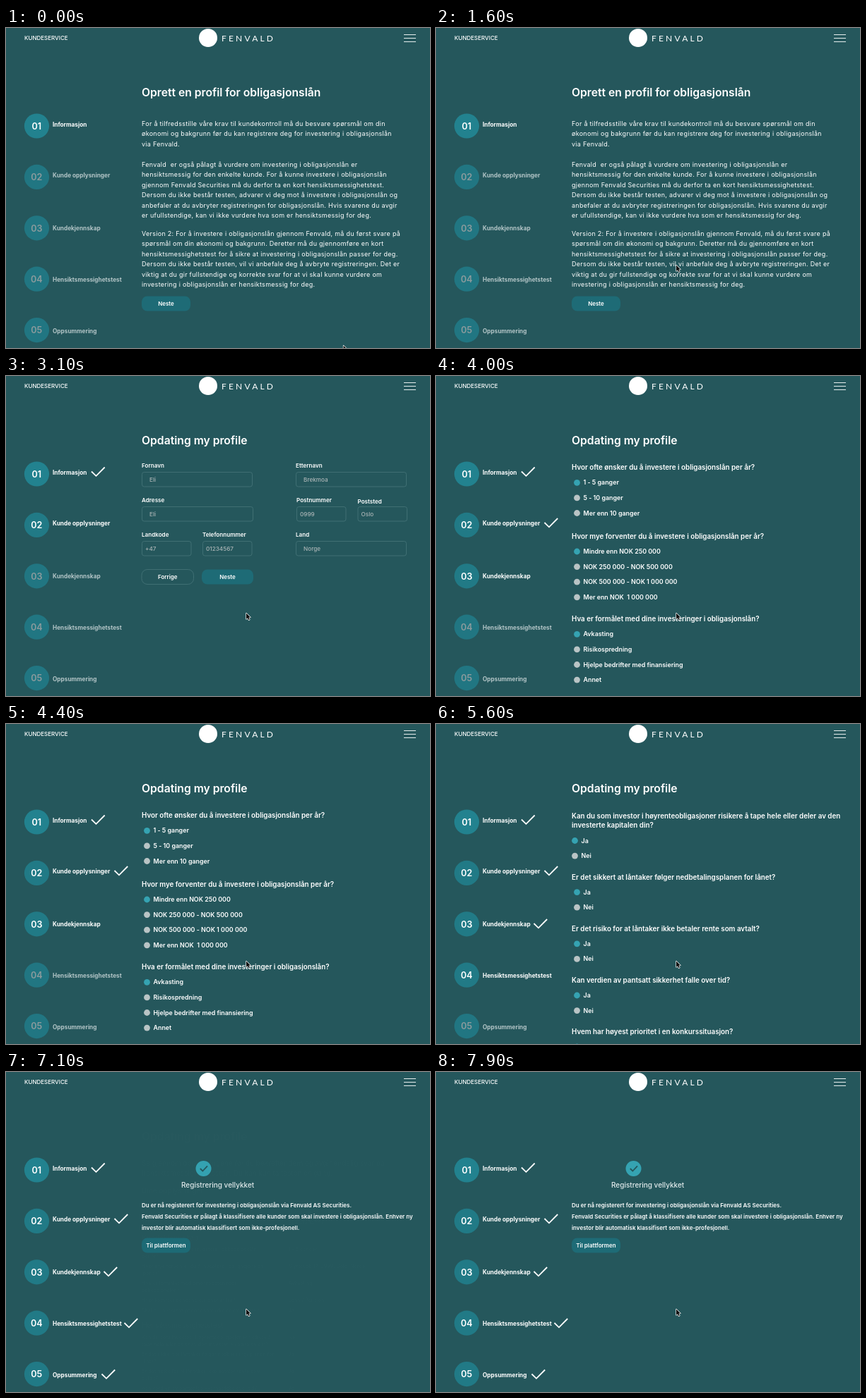
These frames come from a looping animation (600 px wide and 454 px high, 8000 ms). An HTML page with a canvas:

```html
<!DOCTYPE html>
<html lang="no">
<head>
<meta charset="utf-8">
<title>Registrering</title>
<style>
html, body { margin: 0; width: 600px; height: 454px; overflow: hidden; background: #25575c; }
canvas { display: block; width: 600px; height: 454px; }
</style>
</head>
<body>
<canvas id="stage"></canvas>
<script>
const LOOP = 8000, STEP = 100, FADE = 450;
const SWITCHES = [1750, 3150, 4450, 5700, 6700];
const BG = '#25575c', WHITE = '#fff', TEAL = '#35a3b2', BUTTON = '#1e6b76', LINE = '#437277';
const COMPANY = 'Fenvald', FIRST = 'Eli', LAST = 'Brekmoa', PHONE = '01234567';
const POSTCODE = '0999', ADDRESS = `Myrstubb 17, ${POSTCODE}, Oslo, Norge`;

const canvas = document.getElementById('stage');
const ctx = canvas.getContext('2d');
const ratio = window.devicePixelRatio || 1;
canvas.width = 600 * ratio;
canvas.height = 454 * ratio;
ctx.scale(ratio, ratio);

function text(str, x, y, size, { weight = 600, color = WHITE, align = 'left', spacing = 0, family = 'Inter' } = {}) {
  ctx.font = `${weight} ${size}px ${family}, sans-serif`;
  ctx.letterSpacing = spacing + 'px';
  ctx.textAlign = align;
  ctx.fillStyle = color;
  ctx.fillText(str, x, y);
}

function lines(list, x, y, leading, size, style) {
  list.forEach((str, i) => text(str, x, y + i * leading, size, style));
}

function disc(x, y, r, color) {
  ctx.fillStyle = color;
  ctx.beginPath();
  ctx.arc(x, y, r, 0, Math.PI * 2);
  ctx.fill();
}

function stroke(points, color, width) {
  ctx.strokeStyle = color;
  ctx.lineWidth = width;
  ctx.beginPath();
  points.forEach(([x, y]) => ctx.lineTo(x, y));
  ctx.stroke();
}

function box(x, y, w, h, r, fill) {
  ctx.beginPath();
  ctx.roundRect(x, y, w, h, r);
  if (fill) {
    ctx.fillStyle = fill;
    ctx.fill();
  } else {
    ctx.strokeStyle = LINE;
    ctx.lineWidth = 0.9;
    ctx.stroke();
  }
}

function button(label, x, y, w, fill) {
  box(x, y, w, 21, 8, fill);
  text(label, x + w / 2, y + 13.5, 8, { align: 'center' });
}

function faded(alpha, draw) {
  if (alpha <= 0) return;
  ctx.globalAlpha = alpha;
  draw();
  ctx.globalAlpha = 1;
}

function field(label, value, x, y, w, { pad = 5, labelY = y - 6 } = {}) {
  text(label, x, labelY, 8.1);
  box(x + 0.5, y + 0.5, w - 1, 20.5, 3);
  text(value, x + pad, y + 13.5, 8.2, { weight: 500, color: '#a9b4b5' });
}

// First option is the selected one.
function question(title, y, options, x = 199.5) {
  lines(title.split('\n'), 192, y, 13.8, 9.8);
  const top = y + 18 + (title.includes('\n') ? 14 : 0);
  options.forEach((label, i) => {
    const cy = top + i * 21.6;
    disc(x, cy, 4.4, i ? '#b9c4c5' : TEAL);
    text(label, x + 9, cy + 3, 8.9);
  });
}

function row(y, label, value) {
  lines(label.split('\n'), 192, y, 10, 7.15);
  text(value, 399.5, y, 7.15);
}

function introPage() {
  const body = { weight: 400, spacing: 0.28 };
  lines([
    'For å tilfredsstille våre krav til kundekontroll må du besvare spørsmål om din',
    'økonomi og bakgrunn før du kan registrere deg for investering i obligasjonslån',
    `via ${COMPANY}.`
  ], 192, 139, 14.4, 9, body);
  lines([
    `${COMPANY}  er også pålagt å vurdere om investering i obligasjonslån er`,
    'hensiktsmessig for den enkelte kunde. For å kunne investere i obligasjonslån',
    `gjennom ${COMPANY} Securities må du derfor ta en kort hensiktsmessighetstest.`,
    'Dersom du ikke består testen, advarer vi deg mot å investere i obligasjonslån og',
    'anbefaler at du avbryter registreringen for obligasjonslån. Hvis svarene du avgir',
    'er ufullstendige, kan vi ikke vurdere hva som er hensiktsmessig for deg.'
  ], 192, 197, 14.4, 9, body);
  lines([
    `Version 2: For å investere i obligasjonslån gjennom ${COMPANY}, må du først svare på`,
    'spørsmål om din økonomi og bakgrunn. Deretter må du gjennomføre en kort',
    'hensiktsmessighetstest for å sikre at investering i obligasjonslån passer for deg.',
    'Dersom du ikke består testen, vil vi anbefale deg å avbryte registreringen. Det er',
    'viktig at du gir fullstendige og korrekte svar for at vi skal kunne vurdere om',
    'investering i obligasjonslån er hensiktsmessig for deg.'
  ], 192, 295, 14.4, 9, body);
  button('Neste', 192, 380.5, 69, BUTTON);
}

function formPage() {
  field('Fornavn', FIRST, 192, 136, 157, { pad: 11 });
  field('Etternavn', LAST, 410, 136, 157, { pad: 11 });
  field('Adresse', FIRST, 192, 185, 158, { pad: 11 });
  field('Postnummer', POSTCODE, 411, 185, 70.5);
  field('Poststed', 'Oslo', 497.5, 185, 70.5, { labelY: 181 });
  field('Landkode', '+47', 192, 234, 70.5);
  field('Telefonnummer', PHONE, 278, 234, 70.5);
  field('Land', 'Norge', 410, 234, 157, { pad: 11 });
  button('Forrige', 192, 274.5, 73.5);
  button('Neste', 277, 274.5, 73, BUTTON);
}

function knowledgePage() {
  question('Hvor ofte ønsker du å investere i obligasjonslån per år?', 133.3,
    ['1 - 5 ganger', '5 - 10 ganger', 'Mer enn 10 ganger']);
  question('Hvor mye forventer du å investere i obligasjonslån per år?', 231,
    ['Mindre enn NOK 250 000', 'NOK 250 000 - NOK 500 000', 'NOK 500 000 - NOK 1 000 000', 'Mer enn NOK  1 000 000']);
  question('Hva er formålet med dine investeringer i obligasjonslån?', 348.3,
    ['Avkasting', 'Risikospredning', 'Hjelpe bedrifter med finansiering', 'Annet']);
}

function testPage() {
  const answers = ['Ja', 'Nei'];
  question('Kan du som investor i høyrenteobligasjoner risikere å tape hele eller deler av den\ninvesterte kapitalen din?',
    133.5, answers, 196.5);
  question('Er det sikkert at låntaker følger nedbetalingsplanen for lånet?', 220.6, answers);
  question('Er det risiko for at låntaker ikke betaler rente som avtalt?', 293.8, answers);
  question('Kan verdien av pantsatt sikkerhet falle over tid?', 367, answers);
  question('Hvem har høyest prioritet i en konkurssituasjon?', 440, answers);
}

function summaryPage() {
  lines(['Se gjennom opplysningene før du bekrefter dem og avgir endelig svar på',
    'hensiktsmessighetstesten. Du kan kun ta testen én gang.'], 192, 133.3, 14, 9.8);
  text('Dine opplysninger', 192, 171.5, 9.95);
  row(187, 'Navn', `${FIRST} ${LAST}`);
  row(201.5, 'Adresse', ADDRESS);
  row(216, 'Telefonummer', `+47 ${PHONE}`);
  text('Kundekjennskap', 192, 238.7, 9.95);
  row(254, 'Hvor ofte ønsker du å investere i obligasjonslån\nper år?', '1 - 5 ganger');
  row(278, 'Hvor mye forventer du å investere i obligasjonslån\n per år?', ADDRESS);
  row(302, 'Hva er formålet med dine investeringer i\nobligasjonslån?', 'Avkasting');
  row(326, 'Hvor kommer pengene du låner ut fra?', 'Lønn / Pensjon');
  row(340.5, 'Skal du investere penger som ikke er dine egne?', 'Ja');
  text('Hensiktsmessighetstest', 192, 363, 9.95);
  row(378.5, 'Kan du som investor i høyrenteobligasjoner risikere å\ntape hele eller deler av den investerte kapitalen din?', 'Nei');
  row(402.7, 'Er det sikkert at låntaker følger nedbetalingsplanen for\nlånet?', 'Ja');
  row(426.7, 'Er det risiko for at låntaker ikke betaler rente som\navtalt?', 'Ja');
  row(450.7, 'Kan verdien av pantsatt sikkerhet falle over tid?', 'Ja');
}

function donePage() {
  disc(279.5, 137, 11, TEAL);
  stroke([[274.8, 137], [278.3, 140.5], [285, 133.3]], BG, 1.8);
  text('Registrering vellykket', 248, 164, 10, { weight: 500, color: '#e3eced' });
  lines([
    `Du er nå registerert for investering i obligasjonslån via ${COMPANY} AS Securities.`,
    `${COMPANY} Securities er pålagt å klassifisere alle kunder som skal investere i obligasjonslån. Enhver ny`,
    'investor blir automatisk klassifisert som ikke-profesjonell.'
  ], 192, 192, 16.2, 8);
  button('Til plattformen', 192, 235.5, 69, BUTTON);
}

const PROFILE = 'Opdating my profile';
const PAGES = [
  { title: 'Oprett en profil for obligasjonslån', draw: introPage },
  { title: PROFILE, draw: formPage },
  { title: PROFILE, draw: knowledgePage },
  { title: PROFILE, draw: testPage },
  { title: PROFILE, draw: summaryPage },
  { title: '', draw: donePage }
];

const MENU = [
  { label: 'Informasjon', y: 140, checkX: 121, checkY: 128.5, fill: '#22828f' },
  { label: 'Kunde opplysninger', y: 211.8, checkX: 153.5, checkY: 201 },
  { label: 'Kundekjennskap', y: 286.5, checkX: 138.5, checkY: 276 },
  { label: 'Hensiktsmessighetstest', y: 360, checkX: 167.5, checkY: 349 },
  { label: 'Oppsummering', y: 432.5, checkX: 135.5, checkY: 421.5 }
];

function header() {
  text('KUNDESERVICE', 26, 17.3, 8, { weight: 500 });
  disc(286, 14, 13, WHITE);
  text(COMPANY.toUpperCase(), 305, 18.7, 12, { weight: 400, spacing: 3.2, family: 'Lato' });
  [9.5, 14.5, 19.5].forEach(y => stroke([[563, y], [580, y]], '#e6eeee', 1));
}

// progress is the page index, fractional during a dissolve
function sidebar(progress) {
  MENU.forEach(({ label, y, checkX, checkY, fill = '#217a86' }, i) => {
    const cy = 139 + i * 72.4;
    const active = Math.min(1, Math.max(0, progress - i + 1));
    const checked = Math.min(1, Math.max(0, progress - i));
    const item = (discColor, numberColor, labelColor) => {
      disc(43.5, cy, 17.6, discColor);
      text('0' + (i + 1), 43.3, cy + 4.8, 12.6, { color: numberColor, align: 'center' });
      text(label, 66, y, 8.25, { weight: 700, color: labelColor });
    };
    if (active < 1) item('#217682', '#8b9b9d', '#b3c5c7');
    faded(active, () => item(fill, WHITE, WHITE));
    faded(checked, () => stroke(
      [[checkX, checkY + 7], [checkX + 6.5, checkY + 13.3], [checkX + 18.7, checkY + 1]], WHITE, 1.8));
  });
}

function title(from, to, mix) {
  const style = [192, 97.3, 15.7];
  if (from === to) return text(from, ...style);
  faded(1 - mix, () => text(from, ...style));
  faded(mix, () => text(to, ...style));
}

function cursor(time) {
  const p = Math.min(1, time / 200);
  const x = 477 - 137.5 * p, y = 450 - 114 * p;
  const shape = [[0, 0], [0, 8.4], [1.9, 6.7], [3.4, 9.8], [4.8, 9.1], [3.5, 6.1], [6, 5.9]];
  ctx.beginPath();
  shape.forEach(([dx, dy]) => ctx.lineTo(x + 0.5 + dx, y + 0.5 + dy));
  ctx.closePath();
  ctx.lineJoin = 'round';
  ctx.strokeStyle = WHITE;
  ctx.lineWidth = 1.3;
  ctx.stroke();
  ctx.fillStyle = '#111';
  ctx.fill();
  ctx.lineJoin = 'miter';
}

function render(time) {
  const started = SWITCHES.filter(start => time >= start).length;
  const raw = started ? Math.min(1, (time - SWITCHES[started - 1]) / FADE) : 1;
  const mix = 1 - (1 - raw) ** 2;
  const to = PAGES[started], from = PAGES[Math.max(0, started - 1)];

  ctx.fillStyle = BG;
  ctx.fillRect(0, 0, 600, 454);
  header();
  sidebar(started ? started - 1 + mix : 0);
  title(from.title, to.title, mix);
  faded(1 - mix, from.draw);
  faded(mix, to.draw);
  cursor(time);
}

function tick() {
  const time = performance.now() % LOOP;
  render(Math.floor(time / STEP) * STEP);
  requestAnimationFrame(tick);
}
tick();
</script>
</body>
</html>
```
